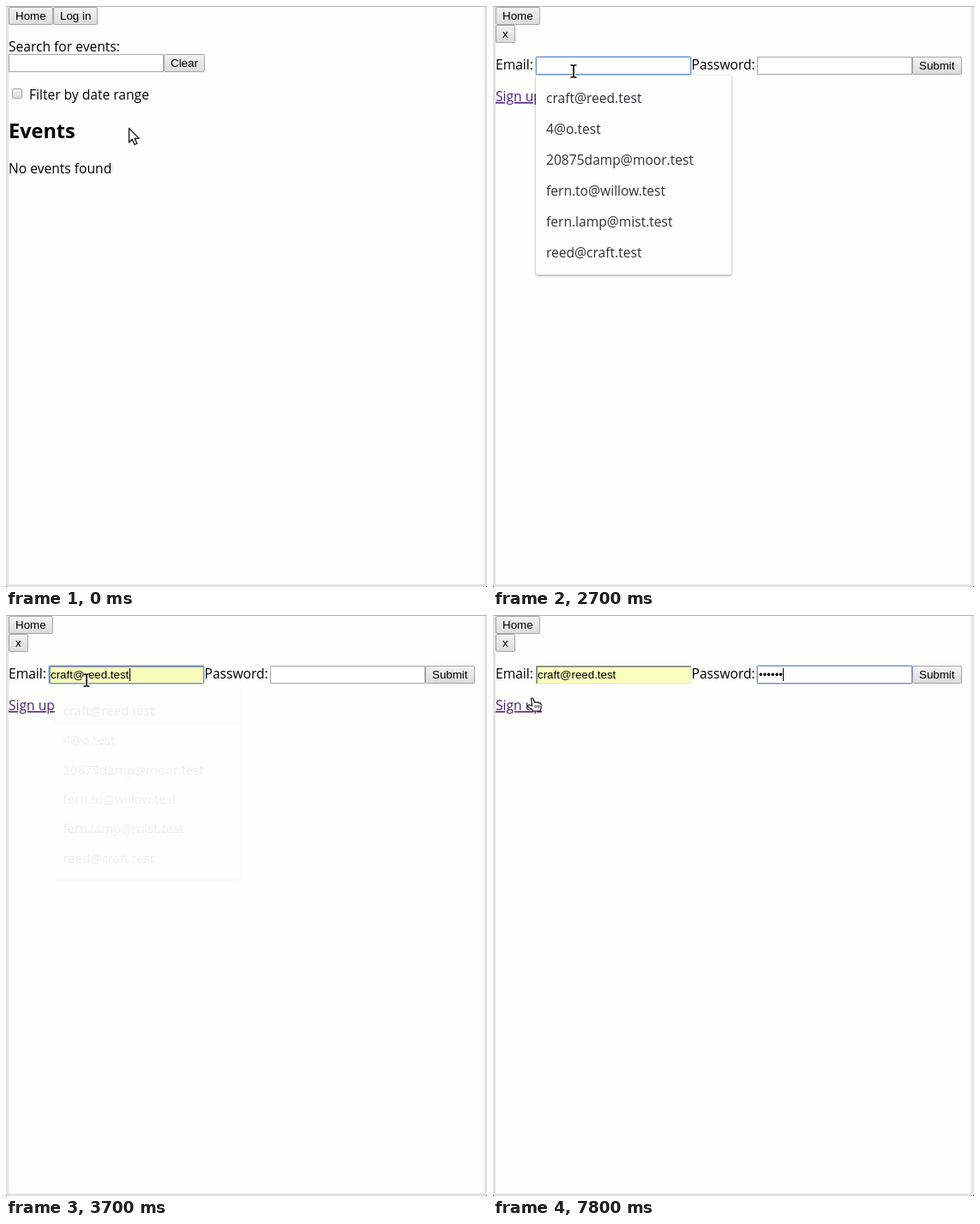
An HTML page for the animation above (8 s loop, 561 by 677 pixels).

```html
<!DOCTYPE html>
<html lang="en">
<head>
<meta charset="utf-8">
<title>Log in form</title>
<style>
  html, body { margin: 0; width: 100%; height: 100%; overflow: hidden; background: #fefefd; }
  svg { display: block; width: 100vw; height: 100vh; }
  text { font: 15.6px "Open Sans", sans-serif; white-space: pre; }
  .ui { font: 13.333px "Liberation Sans", Arial, sans-serif; }
  .heading { font-size: 23.5px; font-weight: 700; }
  .link { fill: #4d2078; text-decoration: underline; text-decoration-skip-ink: none; }
  .item { fill: #2e3436; }
  .menu { filter: drop-shadow(0 1px 1.5px rgba(0, 0, 0, .4)); }
</style>
</head>
<body>
<svg id="stage" viewBox="0 0 561 677">
  <defs>
    <linearGradient id="face" x2="0" y2="1">
      <stop stop-color="#f3f3f3"/><stop offset="1" stop-color="#dcdcdc"/>
    </linearGradient>
    <linearGradient id="hover" x2="0" y2="1">
      <stop stop-color="#f8f8f8"/><stop offset="1" stop-color="#e4e4e4"/>
    </linearGradient>
    <linearGradient id="pressed" x2="0" y2="1">
      <stop stop-color="#d8d8d8"/><stop offset="1" stop-color="#e8e8e8"/>
    </linearGradient>
    <g id="arrow" fill="#fff" stroke="#111" stroke-width="1.3" stroke-linejoin="round">
      <path d="M.5 .5V17L4.3 13.4L7 19.5L9.8 18.2L7.2 12.4H12.2Z"/>
    </g>
    <g id="beam" fill="none">
      <path d="M-3 -7H-1L0 -6L1 -7H3M0 -6V6M-3 7H-1L0 6L1 7H3" stroke="#fff" stroke-width="4"/>
      <path d="M-3.5 -7H-1L0 -6L1 -7H3.5M0 -6V6M-3.5 7H-1L0 6L1 7H3.5" stroke="#111" stroke-width="1.7"/>
    </g>
    <g id="hand" fill="#fff" stroke="#111" stroke-width="1.2" stroke-linejoin="round">
      <path d="M5 1.5Q6.3 0 7.5 1.5L8.8 6Q10.3 4.6 11.4 6Q13 5 14 6.6Q16 6 16.6 8V12.5L15.4 16H7.5L5.5 13.5L1.2 11Q.4 9 2.5 8.8L6.2 10Z"/>
      <path d="M9.6 9V12.5M11.8 9V12.5M14 9V12.5" fill="none" stroke-width=".9"/>
    </g>
  </defs>
  <path d="M0 0H561V677H0Z" fill="#fefefd"/>
  <path d="M0 0H3V674H558V0H561V677H0Z" fill="#dfe3e3"/>
  <path d="M0 0H561V1H0Z" fill="#b2b2b2"/>
  <path d="M0 676h1v1H0ZM560 676h1v1h-1Z" fill="#444"/>
  <g id="scene"></g>
</svg>
<script>
const LOOP = 8000, STEP = 100;
const ADDRESS = 'craft@reed.test';
const SUGGESTIONS = [ADDRESS, '4@o.test', '20875damp@moor.test',
  'fern.to@willow.test', 'fern.lamp@mist.test', 'reed@craft.test'];

// Each entry: start time, x, y, shape
const POINTER = [
  [0, 143, 142, 'arrow'], [100, 122, 88, 'arrow'], [200, 95, 30, 'arrow'], [300, 84, 8, 'arrow'],
  [1600, 86, 28, 'arrow'], [1700, 88, 52, 'arrow'], [1800, 94, 76, 'beam'],
  [7000, 63, 76, 'beam'], [7200, 52, 86, 'arrow'], [7300, 47, 91, 'arrow'],
  [7400, 43, 97, 'hand'], [7800, 39.5, 96, 'hand']];
// Start time, number of typed characters
const TYPING = [[0, 0], [4900, 1], [5100, 2], [5200, 3], [5300, 5], [5400, 6]];
// Start time, caret visible
const BLINK = [[0, 0], [2100, 1], [2700, 0], [3300, 1], [4400, 0], [4900, 1],
  [6000, 0], [6700, 1], [7200, 0], [7800, 1]];

const at = (track, t) => track.findLast(entry => entry[0] <= t);
const label = (x, y, text, kind = '') => `<text x="${x}" y="${y}" class="${kind}">${text}</text>`;
const box = (x, y, w, h, fill, stroke, r = 0) =>
  `<rect x="${x + .5}" y="${y + .5}" width="${w - 1}" height="${h - 1}" rx="${r}" fill="${fill}" stroke="${stroke}"/>`;

const button = (x, y, w, text, face = 'face') =>
  box(x, y, w, 21, `url(#${face})`, '#a6a6a6', 1.5) + label(x + 8, y + 15, text, 'ui');

function field(x, y, { focused, filled, text = '' } = {}) {
  const fill = filled ? '#faffbd' : '#fff';
  let out = box(x, y, 181, 21, fill, filled ? '#e6e8cf' : '#a9a9a9');
  if (filled) out += `<path d="M${x + 1} ${y + 21}V${y + 1}H${x + 181}" fill="none" stroke="#94958a" stroke-width="2"/>`;
  if (focused) out += box(x - 1, y - 1, 183, 23, 'none', '#bcd0ec', 2) + box(x, y, 181, 21, 'none', '#6c94cc', 1);
  return out + label(x + 2, y + 15, text, 'ui');
}

const caret = x => `<path d="M${x} 62h1v15h-1Z"/>`;

function homePage(t) {
  const face = t >= 1000 ? 'pressed' : t >= 300 ? 'hover' : 'face';
  return button(3, 1, 52, 'Home') + button(55, 1, 52, 'Log in', face)
    + label(3, 53, 'Search for events:') + field(3, 56) + button(184, 56, 48, 'Clear')
    + box(7, 96, 12, 12, 'url(#face)', '#a3a3a3', 2) + label(27, 109, 'Filter by date range')
    + label(3, 154, 'Events', 'heading') + label(3, 195, 'No events found');
}

function menu(t) {
  const closing = t >= 3500, u = (t - 3500) / 200;
  const scale = closing ? .997 - .041 * u : 1;
  const opacity = closing ? .82 - .75 * u : 1;
  const highlight = t >= 3300 ? '<path d="M50 90H278V125H50Z" fill="#e6e8e8"/>' : '';
  return `<g opacity="${opacity}" transform="translate(164 197) scale(${scale}) translate(-164 -197)">
    <rect class="menu" x="50" y="81" width="228" height="232" rx="2" fill="#fefefd"/>${highlight}
    ${SUGGESTIONS.map((s, i) => label(62, 113 + 36 * i, s, 'item')).join('')}</g>`;
}

function loginPage(t) {
  const filled = t >= 3300, onPassword = t >= 3800, onEmail = t >= 2100 && !onPassword;
  const typed = at(TYPING, t)[1];
  const caretX = onPassword ? 310 + Math.round(typed * 4.67) : t >= 3500 ? 144 : 52;
  return button(3, 1, 52, 'Home') + button(3, 22, 23, 'x')
    + label(3, 74, 'Email:') + field(50, 59, { focused: onEmail, filled, text: filled ? ADDRESS : '' })
    + label(231.5, 74, 'Password:') + field(308, 59, { focused: onPassword, text: '•'.repeat(typed) })
    + button(489, 59, 58, 'Submit') + label(3, 111, 'Sign up', 'link')
    + (onEmail ? menu(t) : '') + (at(BLINK, t)[1] ? caret(caretX) : '');
}

function draw(t) {
  const [, x, y, shape] = at(POINTER, t);
  return (t < 1100 ? homePage(t) : loginPage(t)) + `<use href="#${shape}" x="${x}" y="${y}"/>`;
}

const scene = document.getElementById('scene');
let shown = -1;
function tick() {
  const t = Math.floor(performance.now() % LOOP / STEP) * STEP;
  if (t !== shown) scene.innerHTML = draw(shown = t);
  requestAnimationFrame(tick);
}
tick();
</script>
</body>
</html>
```
